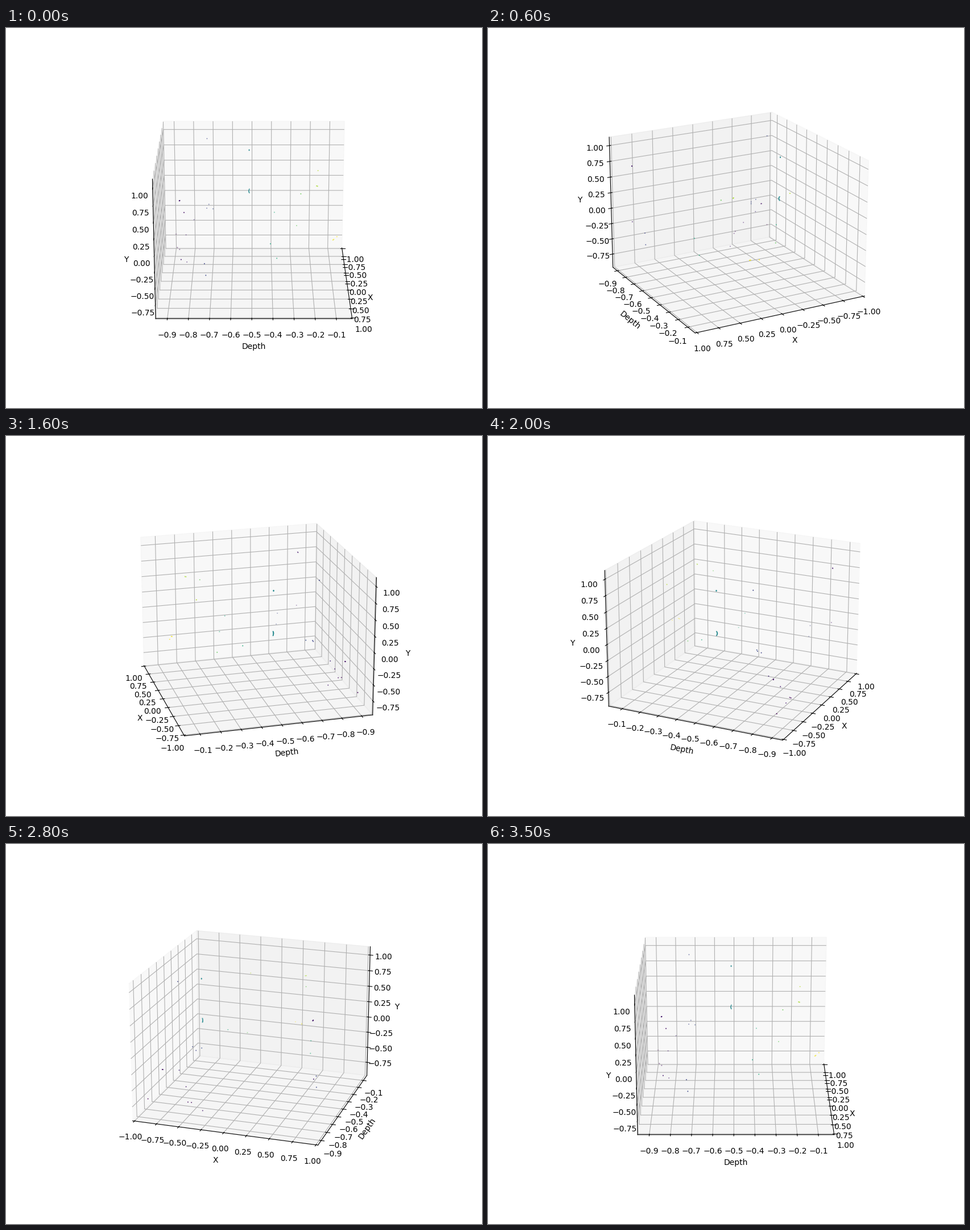
These frames come from a looping animation (837x669 px, 3.6 s). A matplotlib script:

```python
import matplotlib.pyplot as plt
import numpy as np
from matplotlib.animation import FuncAnimation

W, H, DPI = 837, 669, 100
FRAMES, INTERVAL = 36, 100

# x, depth, y of the sparse points
POINTS = [
    (-.674, -.727, 1.000), (-.265, -.172, .672), (.440, -.266, .641),
    (.877, -.836, .748), (-.758, -.851, -.239), (-.616, -.797, -.287),
    (-.477, -.729, -.030), (-.524, -.719, .010), (-.438, -.697, -.021),
    (-.375, -.387, -.046), (-.229, -.276, -.187), (-.892, -.897, -.668),
    (-.508, -.837, -.482), (-.453, -.881, -.662), (-.423, -.869, -.677),
    (.890, -.833, -.132), (-.329, -.831, -.834), (.851, -.724, -.216),
    (.851, -.718, -.396), (.594, -.411, -.048), (.571, -.380, -.286),
    (.205, -.084, -.141),
]


def strand(center, span, n, bow=0.0):
    """Points spread evenly along a short segment, optionally bent."""
    t = np.linspace(-1, 1, n)[:, None]
    bend = bow * (1 - t ** 2) * np.array([1, -0.5, 0])
    return np.array(center) + t * np.array(span) / 2 + bend


cloud = np.vstack([
    POINTS,
    strand((-.573, -.513, .204), (0, 0, .062), 9, .006),
    strand((-.578, -.514, .858), (0, 0, .010), 3),
    strand((.387, -.188, .734), (.008, .004, 0), 2),
    strand((.291, -.103, -.144), (-.006, .004, .006), 2),
    strand((.877, -.836, .748), (.004, .002, .006), 2),
    strand((-.758, -.851, -.239), (.008, 0, 0), 2),
])
x, depth, y = cloud.T

# the added fraction guards against rounding down to a smaller canvas
fig = plt.figure(figsize=((W + .01) / DPI, (H + .01) / DPI), dpi=DPI)
ax = fig.add_subplot(projection="3d")
ax.scatter(x, depth, y, c=depth, cmap="viridis", s=1, linewidths=0.4)
ax.set(xlim=(-1.0213, 1.0213), ylim=(-.9552, -.0250), zlim=(-.9683, 1.1331),
       xlabel="X", ylabel="Depth", zlabel="Y")


def update(i):
    # the tiny offset keeps the side wall choice stable when seen head-on
    azim = 360 * i / (FRAMES - 1) % 360 + 1e-4
    ax.view_init(elev=20, azim=azim)
    return []


anim = FuncAnimation(fig, update, frames=FRAMES, init_func=lambda: [],
                     interval=INTERVAL, repeat=True, repeat_delay=0)
plt.show()
```
